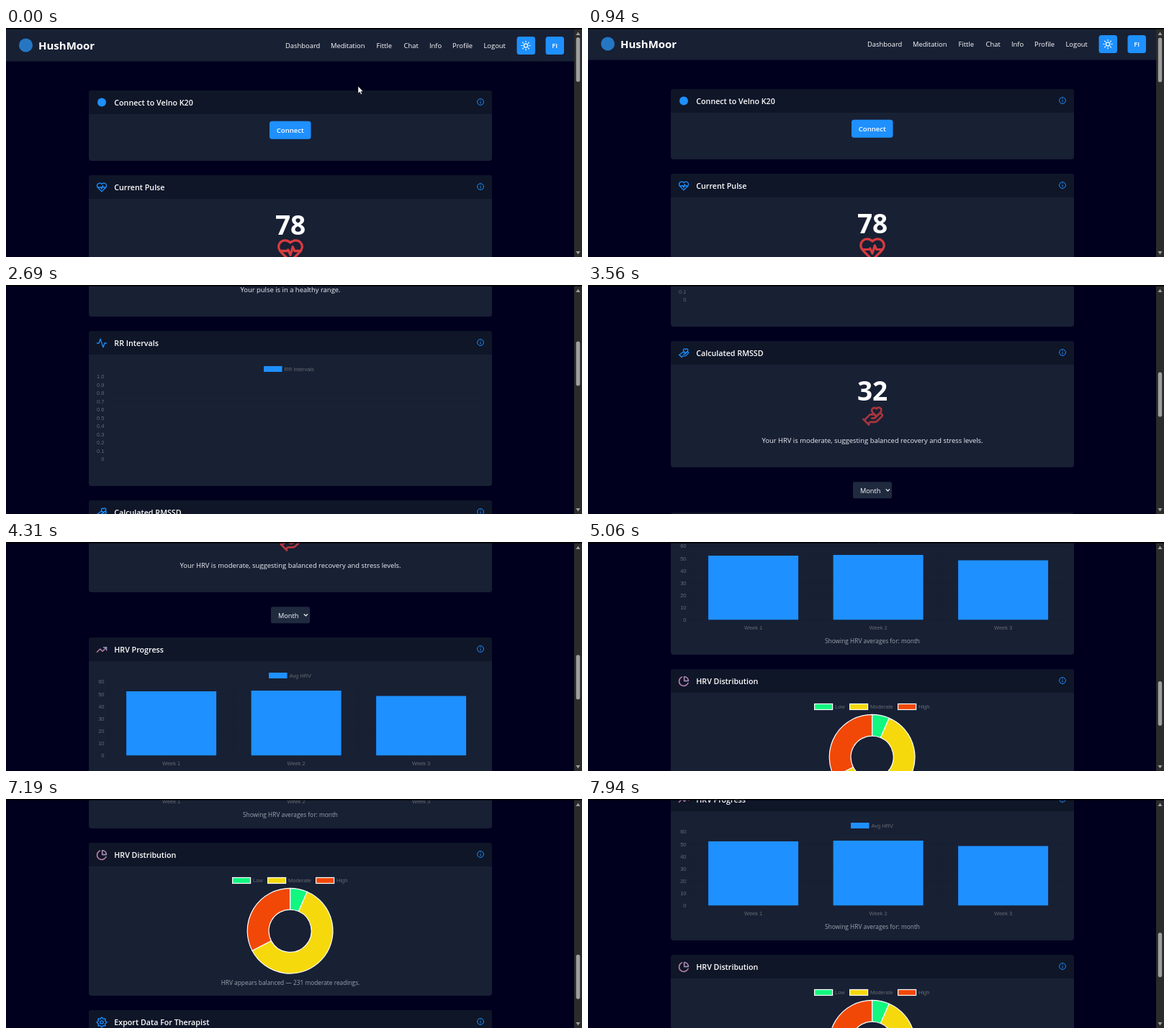
An HTML page for the animation above (8 s loop, 800 px wide and 319 px high).

```html
<!DOCTYPE html>
<html lang="en">
<head>
<meta charset="utf-8">
<title>HushMoor dashboard</title>
<style>
  html, body { margin: 0; width: 100%; height: 100%; overflow: hidden; background: #00001e; }
  svg { display: block; width: 100%; height: 100%; }
  text { font-family: "Open Sans", "Noto Sans", sans-serif; fill: #fff; white-space: pre; }
  .chart { font-family: "Liberation Sans", Arial, sans-serif; fill: #666a70; }
  .icon { fill: none; stroke-width: 2; stroke-linecap: round; stroke-linejoin: round; }
</style>
</head>
<body>
<svg id="stage" viewBox="0 0 800 319"></svg>
<script>
const LOOP = 8000, STEP = 62.5, MAX_SCROLL = 1194;
const BLUE = '#1e90ff', RED = '#e53e40', PANEL = '#182034', PANEL_TOP = '#0f1628', MUTED = '#9ca3af';
const MID = 395;

// ---- drawing helpers ----
const rect = (x, y, w, h, fill, extra = '') =>
  `<rect x="${x}" y="${y}" width="${w}" height="${h}" fill="${fill}" ${extra}/>`;

// y is the vertical middle of the capitals
const text = (str, x, y, size, { weight = 400, anchor = 'start', fill = '', cls = '' } = {}) =>
  `<text x="${x}" y="${y + size * 0.36}" font-size="${size}" font-weight="${weight}" ` +
  `text-anchor="${anchor}" class="${cls}" ${fill && `style="fill:${fill}"`}>${str}</text>`;

const label = (str, x, y, anchor = 'start') => text(str, x, y, 7.5, { anchor, cls: 'chart' });
const message = (str, y) => text(str, MID, y, 9.45, { anchor: 'middle', fill: '#eef0f4' });
const caption = (str, y) => text(str, MID, y, 8.35, { anchor: 'middle', fill: MUTED });

const icon = (name, x, y, scale, color) =>
  `<g class="icon" stroke="${color}" transform="translate(${x} ${y}) scale(${scale}) translate(-12 -12)">${ICONS[name]}</g>`;

const button = (str, x, y, w) =>
  rect(x, y, w, 25, BLUE, 'rx="3.5"') +
  text(str, x + w / 2, y + 12.8, 9.55, { weight: 600, anchor: 'middle' });

const paths = (...list) => list.map(d => `<path d="${d}"/>`).join('');

// light line with a red rim
const twoTone = (...list) =>
  `<g stroke="#d8505c" stroke-width="2.6">${paths(...list)}</g>` +
  `<g stroke="#6fb0f5" stroke-width="1.4">${paths(...list)}</g>`;

function gear() {
  let d = '';
  for (let i = 0; i < 32; i++) {
    const a = (i - 1.5) * Math.PI / 16, r = i % 4 === 1 || i % 4 === 2 ? 10.3 : 7.8;
    d += `${i ? 'L' : 'M'}${(12 + r * Math.sin(a)).toFixed(1)} ${(12 - r * Math.cos(a)).toFixed(1)}`;
  }
  return paths(d + 'Z') + '<circle cx="12" cy="12" r="3.3"/>';
}

function sun() {
  let d = '';
  for (let i = 0; i < 8; i++) {
    const s = Math.sin(i * Math.PI / 4), c = Math.cos(i * Math.PI / 4);
    d += `M${12 + 8 * s} ${12 + 8 * c}L${12 + 10 * s} ${12 + 10 * c}`;
  }
  return paths(d) + '<circle cx="12" cy="12" r="4.3"/>';
}

const ICONS = {
  heart: paths(
    'M19 14c1.5-1.5 3-3.2 3-5.5A5.5 5.5 0 0 0 16.5 3c-1.8 0-3 .5-4.5 2-1.5-1.5-2.7-2-4.5-2A5.5 5.5 0 0 0 2 8.5c0 2.3 1.5 4 3 5.5l7 7Z',
    'M3.2 12H9.5l.5-1 2 4.5 2-7 1.5 3.5h5.3'),
  wave: paths('M22 12h-4l-3 9L9 3l-3 9H2'),
  hand: paths(
    'M11 14h2a2 2 0 1 0 0-4h-3c-.6 0-1.1.2-1.4.6L3 16',
    'M7 20l1.6-1.4c.3-.4.8-.6 1.4-.6h4c1.1 0 2.1-.4 2.8-1.2l4.6-4.4a2 2 0 0 0-2.75-2.9l-4.2 3.9',
    'M2 15l6 6',
    'M19.5 8.5c.7-.7 1.5-1.6 1.5-2.7A2.7 2.7 0 0 0 16 4a2.8 2.8 0 0 0-5 1.8c0 1.2.8 2 1.5 2.8L16 12Z'),
  trend: twoTone('M22 7l-8.5 8.5-5-5L2 17M16 7h6v6'),
  pie: twoTone('M13 11V2a10 10 0 0 1 9 9Z', 'M21.2 15.9A10 10 0 1 1 8 2.8'),
  gear: gear(),
  sun: sun()
};

function card(y, h, title, name) {
  const mark = name ? icon(name, 133, y + 17, 0.65, BLUE)
                    : `<circle cx="133" cy="${y + 16.5}" r="6" fill="${BLUE}"/>`;
  return rect(115, y, 560, h, PANEL, 'rx="4"') +
    `<path d="M115 ${y + 33}v-29a4 4 0 0 1 4-4h552a4 4 0 0 1 4 4v29Z" fill="${PANEL_TOP}"/>` + mark +
    text(title, 150.3, y + 17, 10.7, { weight: 600 }) +
    `<g fill="none" stroke="${BLUE}"><circle cx="659" cy="${y + 16}" r="4.4"/>` +
    `<path d="M659 ${y + 15.6}v2.8M659 ${y + 13.3}v1.1"/></g>`;
}

const reading = (y, value, note) =>
  text(value, MID, y + 69.3, 37, { weight: 700, anchor: 'middle' }) + message(note, y + 138.5);

function axis(y0, gap, values) {
  return values.map((v, i) => {
    const y = y0 - i * gap;
    return label(v, 136.5, y, 'end') + rect(139, y - 0.25, 524, 0.5, '#000', 'opacity=".13"');
  }).join('');
}

function barChart() {
  const base = 1040.3, tops = [951, 950, 957.5], cell = 173.5;
  let out = rect(365, 925, 25.5, 8, BLUE) + label('Avg HRV', 393.5, 929) +
    axis(base, 17.1, [0, 10, 20, 30, 40, 50, 60]);
  tops.forEach((top, i) => {
    const x = 229.6 + i * cell;
    out += rect(x - cell / 2, 938, 0.5, 106, '#000', 'opacity=".13"') +
      rect(x - 62.5, top, 125, base - top, BLUE) + label('Week ' + (i + 1), x, 1051.5, 'middle');
  });
  return out + caption('Showing HRV averages for: month', 1070.3);
}

function donut() {
  const cx = 394.6, cy = 1231.7, R = 59.4, r = 29.6;
  const at = (rad, deg) => {
    const a = deg * Math.PI / 180;
    return `${cx + rad * Math.sin(a)} ${cy - rad * Math.cos(a)}`;
  };
  const parts = [
    ['Low', '#12f77f', 0, 23.5, 314], ['Moderate', '#f6d90d', 23.5, 242.4, 363], ['High', '#f14808', 242.4, 360, 430]
  ];
  return parts.map(([name, color, a, b, x]) => {
    const big = b - a > 180 ? 1 : 0, pen = 'stroke="#fff" stroke-width="1.2"';
    return rect(x + 0.6, 1157.5, 25, 8, color, pen) + label(name, x + 29, 1161.3) +
      `<path d="M${at(R, a)}A${R} ${R} 0 ${big} 1 ${at(R, b)}L${at(r, b)}A${r} ${r} 0 ${big} 0 ${at(r, a)}Z" ` +
      `fill="${color}" ${pen} stroke-linejoin="round"/>`;
  }).join('');
}

function header() {
  const links = [['Dashboard', 388], ['Meditation', 451], ['Fittle', 514.5], ['Chat', 552.5],
    ['Info', 588], ['Profile', 620], ['Logout', 663.5]];
  return rect(0, 0, 789, 46.5, PANEL) +
    '<circle cx="27.5" cy="24" r="9.5" fill="#2577c4"/>' +
    text('HushMoor', 45, 25, 15, { weight: 700 }) +
    links.map(([name, x]) => text(name, x, 25, 9.4)).join('') +
    rect(709.5, 12, 25.5, 25, BLUE, 'rx="3.5"') + icon('sun', 722, 24.5, 0.62, '#fff') +
    rect(749.5, 12, 25.5, 25, BLUE, 'rx="3.5"') +
    text('FI', 762.2, 24.8, 9.4, { weight: 600, anchor: 'middle' });
}

function page() {
  return header() +
    card(87, 98, 'Connect to Velno K20') + button('Connect', 366, 129.7, 57.5) +
    card(205, 176, 'Current Pulse', 'heart') + reading(205, 78, 'Your pulse is in a healthy range.') +
    card(401, 216, 'RR Intervals', 'wave') + rect(358, 450, 25.5, 8, BLUE) + label('RR Intervals', 386.5, 454) +
    axis(579.3, 11.5, [0, 0.1, 0.2, 0.3, 0.4, 0.5, 0.6, 0.7, 0.8, 0.9, '1.0']) +
    card(637, 176, 'Calculated RMSSD', 'hand') +
    reading(637, 32, 'Your HRV is moderate, suggesting balanced recovery and stress levels.') +
    rect(368, 833.3, 54, 23, '#1f2a3f', 'rx="2.5"') + text('Month', 378, 845.3, 9.2) +
    '<path d="M413.8 843.3l2.6 2.6 2.6-2.6" fill="none" stroke="#fff" stroke-width="1.2"/>' +
    card(876, 213, 'HRV Progress', 'trend') + barChart() +
    card(1109, 213, 'HRV Distribution', 'pie') + donut() +
    caption('HRV appears balanced — 231 moderate readings.', 1303.7) +
    card(1342, 98, 'Export Data For Therapist', 'gear') + button('Export Data to PDF', 341, 1385, 107) +
    rect(0, 1480, 789, 40, PANEL) + caption('© 2025 HushMoor. All rights reserved.', 1497);
}

const stage = document.getElementById('stage');
stage.innerHTML = rect(0, 0, 800, 319, '#00001e') +
  `<g id="page">${page()}` +
  `<g id="beatHeart">${icon('heart', 0, 0, 1.36, RED)}</g><g id="beatHand">${icon('hand', 0, 0, 1.3, RED)}</g></g>` +
  rect(789, 0, 11, 319, '#2b2b2b') +
  '<path d="M794.5 5.5l3 4.5h-6ZM794.5 315.5l3-4.5h-6Z" fill="#9f9f9f"/>' +
  rect(791.8, 13, 5.4, 62, '#9f9f9f', 'rx="2.7" id="thumb"') +
  rect(0, 0, 800, 1.7, '#000') +
  '<path id="cursor" d="M0 0v10.2l2.3-2.1 1.6 3.5 1.7-.8-1.6-3.3h3.1Z" fill="#fff" stroke="#000" stroke-width=".5"/>';
const el = id => document.getElementById(id);
const pageEl = el('page'), thumb = el('thumb'), cursor = el('cursor'), heart = el('beatHeart'), hand = el('beatHand');

// ---- motion: [step, scroll offset], 16 steps a second ----
const KEYS = [[0, 0], [13.6, 0], [27, 115], [57, 559], [81, 932], [97, MAX_SCROLL],
  [105, MAX_SCROLL], [115, 1048], [127, 892], [128, 879]];
const slope = i => (KEYS[i + 1][1] - KEYS[i][1]) / (KEYS[i + 1][0] - KEYS[i][0]);

// harmonic mean keeps the curve monotone between keys
function tangent(i) {
  if (i === 0) return slope(0);
  if (i === KEYS.length - 1) return slope(i - 1);
  const a = slope(i - 1), b = slope(i);
  return a * b > 0 ? 2 * a * b / (a + b) : 0;
}

function scrollAt(n) {
  let i = 0;
  while (i < KEYS.length - 2 && n >= KEYS[i + 1][0]) i++;
  const [n0, a] = KEYS[i], [n1, b] = KEYS[i + 1], w = n1 - n0, u = Math.min(1, (n - n0) / w);
  const u2 = u * u, u3 = u2 * u;
  return a * (2 * u3 - 3 * u2 + 1) + b * (3 * u2 - 2 * u3) +
    w * (tangent(i) * (u3 - 2 * u2 + u) + tangent(i + 1) * (u3 - u2));
}

function render(ms) {
  const step = Math.floor((ms % LOOP + 5) / STEP), t = step * STEP;
  const y = Math.round(scrollAt(step));
  pageEl.setAttribute('transform', `translate(0 ${-y})`);
  thumb.setAttribute('y', 13 + 232 * y / MAX_SCROLL);

  const beat = (1 + Math.cos(t * Math.PI / 500)) / 2, size = 1 + 0.2 * beat;
  heart.setAttribute('transform', `translate(395 310.5) scale(${size})`);
  hand.setAttribute('transform', `translate(395.5 742) scale(${size})`);
  heart.setAttribute('opacity', 0.7 + 0.24 * beat);
  hand.setAttribute('opacity', 0.7 + 0.24 * beat);

  // the pointer leaves towards the scrollbar
  const u = Math.min(1, Math.max(0, (t - 120) / 650)), e = u * u * (3 - 2 * u);
  cursor.setAttribute('transform', `translate(${489 + 313 * e} ${81 - 36 * e})`);
}

const start = performance.now();
function tick() {
  render(performance.now() - start);
  requestAnimationFrame(tick);
}
tick();
</script>
</body>
</html>
```
